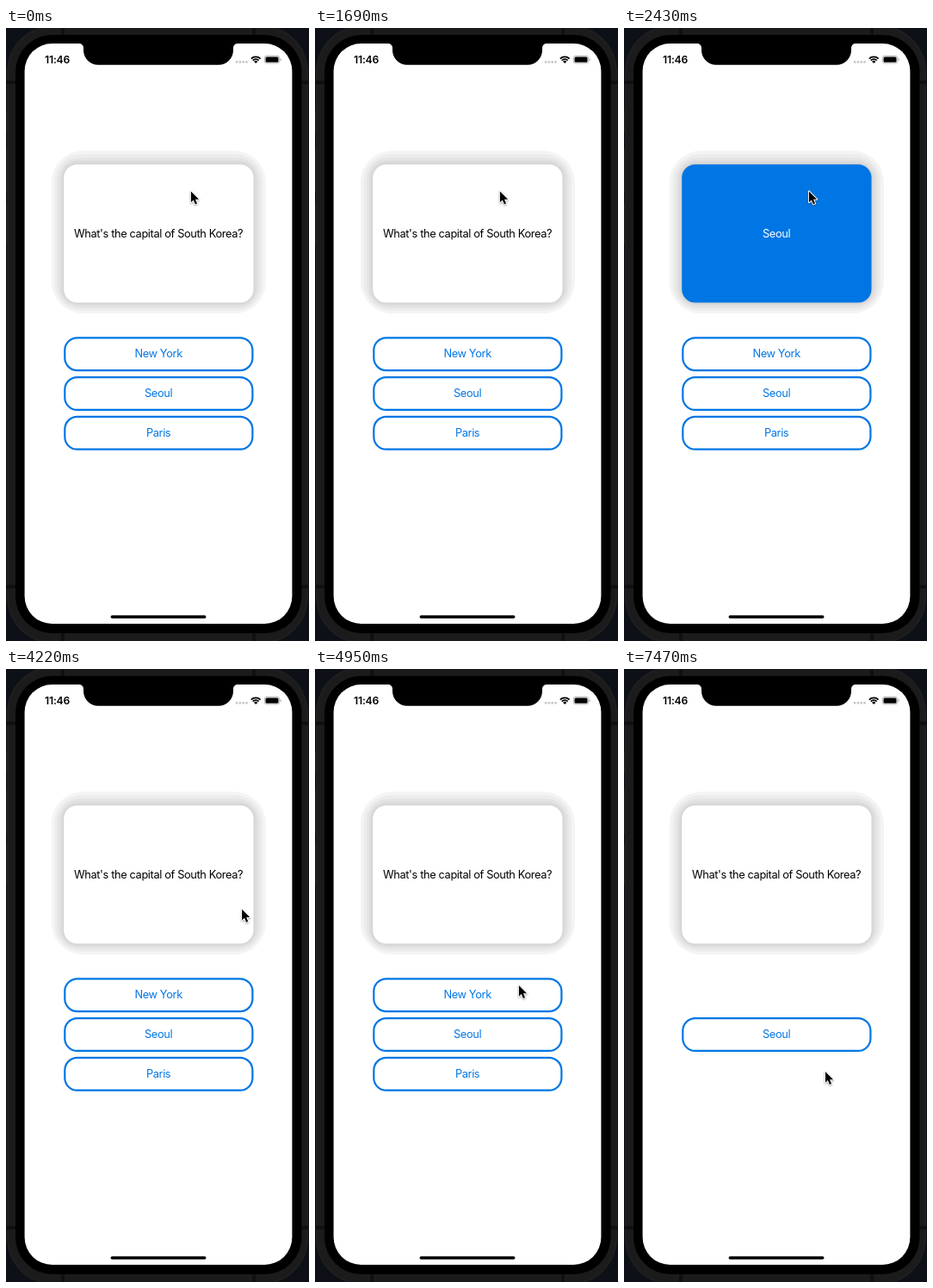
These frames come from a looping animation (352 by 711 pixels, 8 s). An HTML page with a canvas:

```html
<!DOCTYPE html>
<html lang="en">
<head>
<meta charset="utf-8">
<title>Quiz card</title>
<style>
  html, body { margin: 0; width: 100%; height: 100%; overflow: hidden; background: #0d1017; }
  canvas { display: block; width: 352px; height: 711px; }
</style>
</head>
<body>
<canvas id="stage"></canvas>
<script>
const W = 352, H = 711, LOOP = 8000, TICK = 146;
const BLUE = '#0076e4';
const canvas = document.getElementById('stage');
const ctx = canvas.getContext('2d');
const ratio = window.devicePixelRatio || 1;
canvas.width = W * ratio;
canvas.height = H * ratio;

const FLIPS = [500, 1690, 2430, 3330];

const BUTTONS = [
  { label: 'New York', gone: 5250 },
  { label: 'Seoul' },
  { label: 'Paris', pressed: 7320, gone: 7470 }
];

// Each pointer stroke is a cubic curve, walked in equal ticks
const STROKES = [
  { start: 3780, steps: 9, x: [213, 337, 232, 235], y: [188.5, 248, 338, 366] },
  { start: 6150, steps: 7, x: [235, 256, 227, 232], y: [366, 383.5, 479.5, 466] }
];

const clamp = (v, lo, hi) => Math.min(hi, Math.max(lo, v));

function bezier([a, b, c, d], s) {
  const r = 1 - s;
  return a * r ** 3 + 3 * b * s * r * r + 3 * c * s * s * r + d * s ** 3;
}

function pointerAt(t) {
  const stroke = t < STROKES[1].start ? STROKES[0] : STROKES[1];
  const step = Math.floor((t - stroke.start) / TICK) + 1;
  const s = clamp(step / stroke.steps, 0, 1);
  return [bezier(stroke.x, s), bezier(stroke.y, s)];
}

function box(x, y, w, h, r, fill) {
  ctx.beginPath();
  ctx.roundRect(x, y, w, h, r);
  if (fill) {
    ctx.fillStyle = fill;
    ctx.fill();
  }
}

function text(str, x, y, color, font, spacing, align = 'center') {
  ctx.font = font + ' Inter, sans-serif';
  ctx.letterSpacing = spacing + 'px';
  ctx.textAlign = align;
  ctx.fillStyle = color;
  ctx.fillText(str, x, y);
}

const label = (str, y, color) => text(str, 177.1, y, color, '12.8px', -0.37);

function drawPhone() {
  ctx.fillStyle = '#0d1017';
  ctx.fillRect(0, 0, W, H);
  ctx.fillStyle = '#1f1f20';
  ctx.fillRect(0, 96, 2, 25);
  ctx.fillRect(0, 141, 2, 50);
  ctx.fillRect(0, 203, 2, 48);
  box(1, -3, 350, 717, 54, '#1f1f20');
  box(3, -1, 346, 713, 52, '#1b1b1c');

  // Antenna lines
  ctx.fillStyle = '#101011';
  for (const near of [true, false]) {
    ctx.fillRect(near ? 64 : 286, 0, 4, H);
    ctx.fillRect(1, near ? 61 : 646, 350, 4);
  }

  box(11, 8, 332.5, 694, 43, '#000');
  box(21.6, 18, 310.8, 673, 32, '#fff');
  drawNotch();
  box(121.5, 681.3, 111, 3.5, 1.75, '#000');
}

function drawNotch() {
  ctx.fillStyle = '#000';
  ctx.beginPath();
  ctx.moveTo(85, 17);
  ctx.lineTo(85, 18);
  ctx.arcTo(90, 18, 90, 23, 5);
  ctx.arcTo(90, 42.8, 110, 42.8, 17);
  ctx.arcTo(264, 42.8, 264, 23, 17);
  ctx.arcTo(264, 18, 269, 18, 5);
  ctx.lineTo(269, 17);
  ctx.fill();
}

function drawStatus() {
  text('11:46', 45, 41, '#000', '600 12.2px', -0.2, 'left');
  for (let i = 0; i < 4; i++) box(266.7 + i * 3.8, 38, 2.8, 2.8, 1.2, '#c8c8c8');

  // Wi-Fi fan
  const a = Math.PI / 4;
  ctx.strokeStyle = ctx.fillStyle = '#000';
  ctx.lineWidth = 1.8;
  for (const r of [7.6, 4.9]) {
    ctx.beginPath();
    ctx.arc(290.2, 41, r, -3 * a, -a);
    ctx.stroke();
  }
  ctx.beginPath();
  ctx.moveTo(290.2, 41);
  ctx.arc(290.2, 41, 3, -3 * a, -a);
  ctx.fill();

  // Battery
  box(300.3, 32.3, 17.4, 8.6, 2.6);
  ctx.strokeStyle = '#a0a0a0';
  ctx.lineWidth = 0.8;
  ctx.stroke();
  box(301.5, 33.5, 15, 6.2, 1.5, '#000');
  box(318.6, 35.2, 1, 2.8, 0.5, '#a0a0a0');
}

function drawCard(t) {
  const x = 67.2, y = 158.3, w = 220.3, h = 160.3, r = 15.5, bands = 5;
  for (let i = 0; i < bands; i++) {
    const out = 14.4 * (1 - i / bands) ** 1.4;
    const grey = 244 - 8 * i;
    box(x - out, y - out * 1.12, w + 2 * out, h + 2 * out, r + 1.5 * out,
      `rgb(${grey},${grey},${grey})`);
  }
  const flipped = FLIPS.filter(f => t >= f).length % 2 === 1;
  box(x, y, w, h, r, flipped ? BLUE : '#fff');
  if (flipped) label('Seoul', 243, '#fff');
  else label("What's the capital of South Korea?", 243, '#000');
}

function drawButton({ label: name, pressed = Infinity, gone = Infinity }, i, t) {
  if (t >= gone) return;
  const y = 359.3 + i * 45.8;
  box(68.3, y, 218.1, 37.8, 14.5);
  ctx.strokeStyle = BLUE;
  ctx.lineWidth = 2.2;
  ctx.stroke();
  label(name, y + 23.1, t >= pressed ? 'rgba(0,118,228,0.25)' : BLUE);
}

function drawPointer(t) {
  const [x, y] = pointerAt(t);
  ctx.save();
  ctx.translate(x + 1.9, y + 0.9);
  ctx.lineJoin = 'round';
  ctx.strokeStyle = '#fff';
  ctx.lineWidth = 2;
  ctx.shadowColor = 'rgba(0,0,0,0.4)';
  ctx.shadowBlur = 2 * ratio;
  ctx.shadowOffsetY = 0.8 * ratio;
  const arrow = new Path2D('M0 0V12.8L2.9 10.1 5 15 7.1 14.1 5.1 9.4H9.2Z');
  ctx.stroke(arrow);
  ctx.shadowColor = 'transparent';
  ctx.fillStyle = '#000';
  ctx.fill(arrow);
  ctx.restore();
}

function draw() {
  const t = performance.now() % LOOP;
  ctx.setTransform(ratio, 0, 0, ratio, 0, 0);
  drawPhone();
  drawStatus();
  drawCard(t);
  BUTTONS.forEach((b, i) => drawButton(b, i, t));
  drawPointer(t);
  requestAnimationFrame(draw);
}
draw();
</script>
</body>
</html>
```
